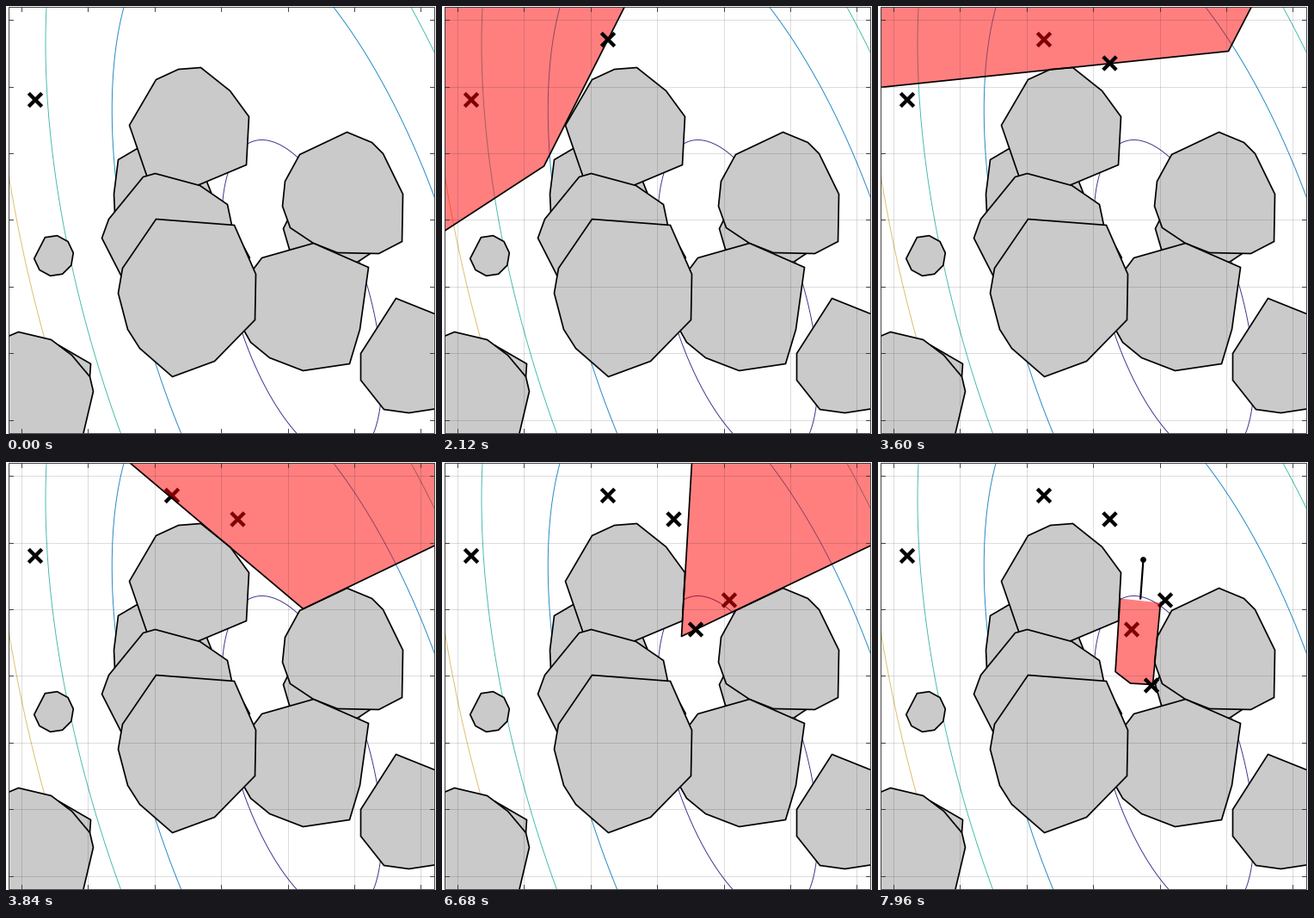
Write a matplotlib script that moves like this. It is 500 by 497 pixels and loops after 8 s.

```python
import numpy as np
import matplotlib.pyplot as plt
from matplotlib.animation import FuncAnimation
from matplotlib.patches import Polygon, Rectangle, Circle

W, H, DPI = 500, 497, 100
STEP, LOOP = 40, 8000
PX = 72 / DPI  # points per pixel
EDGE = 1.7 * PX
LEFT, TOP, RIGHT, BOTTOM = 2, 0.5, 497, 495

fig = plt.figure(figsize=(W / DPI, H / DPI), dpi=DPI, facecolor="white")
ax = fig.add_axes([0, 0, 1, 1])
ax.set_xlim(-0.5, W - 0.5)
ax.set_ylim(H - 0.5, -0.5)
ax.axis("off")
frame = Rectangle((LEFT, TOP), RIGHT - LEFT, BOTTOM - TOP, fill=False,
                  ec="#303030", lw=0.9 * PX, zorder=30)
ax.add_patch(frame)


def add_line(xs, ys, **style):
    line, = ax.plot(xs, ys, **style)
    line.set_clip_path(frame)
    return line


def add_poly(points, **style):
    patch = Polygon(points, closed=True, joinstyle="miter", **style)
    ax.add_patch(patch)
    patch.set_clip_path(frame)
    return patch


# Level curves of a quadratic cost: concentric, similar ellipses
t = np.linspace(0, 2 * np.pi, 800)
for k, color in enumerate(["#3d2f8c", "#1f87c4", "#42bbac", "#dcbd68"]):
    s = np.sqrt(1 + 4.635 * k)
    add_line(343.5 + 93 * s * np.cos(t), 341 + 186 * s * np.cos(t - np.pi / 3),
             color=color, lw=0.95 * PX, zorder=1)

# Obstacles, back to front; hidden or off-stage corners are simplified
OBSTACLES = [
    [(205, 134), (130, 178), (125, 218), (126, 240), (238, 216)],
    [(226, 71), (260, 98), (282, 128), (279, 184), (174, 228), (143, 138),
     (174, 85), (200, 73)],
    [(173, 194), (225, 208), (257, 230), (262, 254), (283, 292), (134, 314),
     (111, 269), (119, 247), (159, 198)],
    [(327, 248), (322, 258), (329, 282), (408, 297), (423, 287)],
    [(396, 146), (425, 158), (438, 171), (461, 218), (460, 273), (433, 287),
     (385, 286), (357, 275), (330, 257), (321, 232), (324, 203), (341, 172)],
    [(357, 275), (421, 303), (411, 375), (399, 415), (345, 423), (306, 408),
     (284, 390), (258, 344), (297, 292)],
    [(174, 247), (265, 254), (290, 311), (289, 364), (242, 412), (193, 430),
     (155, 397), (141, 375), (130, 333), (135, 304)],
    [(453, 339), (698, 437), (468, 472), (439, 468), (412, 434), (412, 403)],
    [(60, 393), (98, 415), (97, 430)],
    [(14, 378), (52, 387), (76, 405), (97, 430), (101, 447), (88, 502),
     (-286, 504)],
]
turn = np.radians(36 * np.arange(10) - 8)
pebble = np.column_stack([55 + 23 * np.cos(turn), 289.5 + 23.7 * np.sin(turn)])
for points in OBSTACLES + [np.delete(pebble, 6, axis=0)]:
    add_poly(points, fc="#cacaca", ec="black", lw=EDGE, zorder=2)

# Ticks and grid
TICKS = 77.4 * np.arange(7)
grid = []
for x, y in zip(17.4 + TICKS, 15.6 + TICKS):
    for a, b in ((BOTTOM, BOTTOM - 5), (TOP, TOP + 5)):
        add_line([x, x], [a, b], color="#303030", lw=0.9 * PX, zorder=30)
    for a, b in ((LEFT, LEFT + 5), (RIGHT, RIGHT - 5)):
        add_line([a, b], [y, y], color="#303030", lw=0.9 * PX, zorder=30)
    thin = dict(color="black", alpha=0.15, lw=0.9 * PX, zorder=25)
    grid.append(add_line([x, x], [TOP, BOTTOM], **thin))
    grid.append(add_line([LEFT, RIGHT], [y, y], **thin))


def add_cross(x, y, z):
    r, style = 7.7, dict(color="black", lw=4.3 * PX, zorder=z,
                         solid_capstyle="butt")
    return [add_line([x - r, x + r], [y - r, y + r], **style),
            add_line([x - r, x + r], [y + r, y - r], **style)]


def add_region(points, z):
    """Translucent area whose outline stays open between its end points."""
    fill = add_poly(points, fc="red", ec="none", alpha=0.5, lw=0, zorder=z)
    xs, ys = zip(*points)
    edge = add_line(xs, ys, color="black", lw=EDGE, zorder=z + 0.1)
    return [fill, edge]


def wedge(apex, a, b):
    """Corner at apex with sides through a and b, reaching off stage."""
    apex, a, b = map(np.array, (apex, a, b))
    return [apex + 10 * (a - apex), apex, apex + 10 * (b - apex)]


CROSSES = [(33.5, 108.5), (192.5, 38.5), (269, 66), (333.5, 160),
           (294.5, 194), (317.5, 259)]
REGIONS = [
    wedge((118, 185.5), (212, 0), (2, 261)),
    wedge((407, 52), (434, 0), (2, 94)),
    wedge((345, 170), (143, 0), (497, 97)),
    wedge((278, 202), (290, 0), (497, 97)),
    [(328, 163), (319, 258), (293, 256.5), (275.5, 243), (281, 158)],
]

# Each region covers the crosses before it; the next cross lies on top
crosses = [add_cross(x, y, 10 + 2 * i) for i, (x, y) in enumerate(CROSSES)]
regions = [add_region(p, 11 + 2 * i) for i, p in enumerate(REGIONS)]
pin = [add_line([304.7, 308], [158, 113], color="black", lw=2.2 * PX,
                zorder=22),
       ax.add_patch(Circle((308, 113), 3.4, color="black", lw=0, zorder=22))]

START, PERIOD, DELAY = 960, 1440, 720


def show(artists, on):
    for artist in artists:
        artist.set_visible(on)


def update(i):
    now = i * STEP
    active = (now - START) // PERIOD
    show(grid, now >= START)
    for k, region in enumerate(regions):
        show(region, k == active)
    for k, cross in enumerate(crosses):
        show(cross, k == 0 or now >= START + DELAY + PERIOD * (k - 1))
    show(pin, active == len(regions) - 1)
    return []


anim = FuncAnimation(fig, update, frames=LOOP // STEP, interval=STEP,
                     init_func=lambda: update(0), repeat=True, repeat_delay=0)
plt.show()
```
